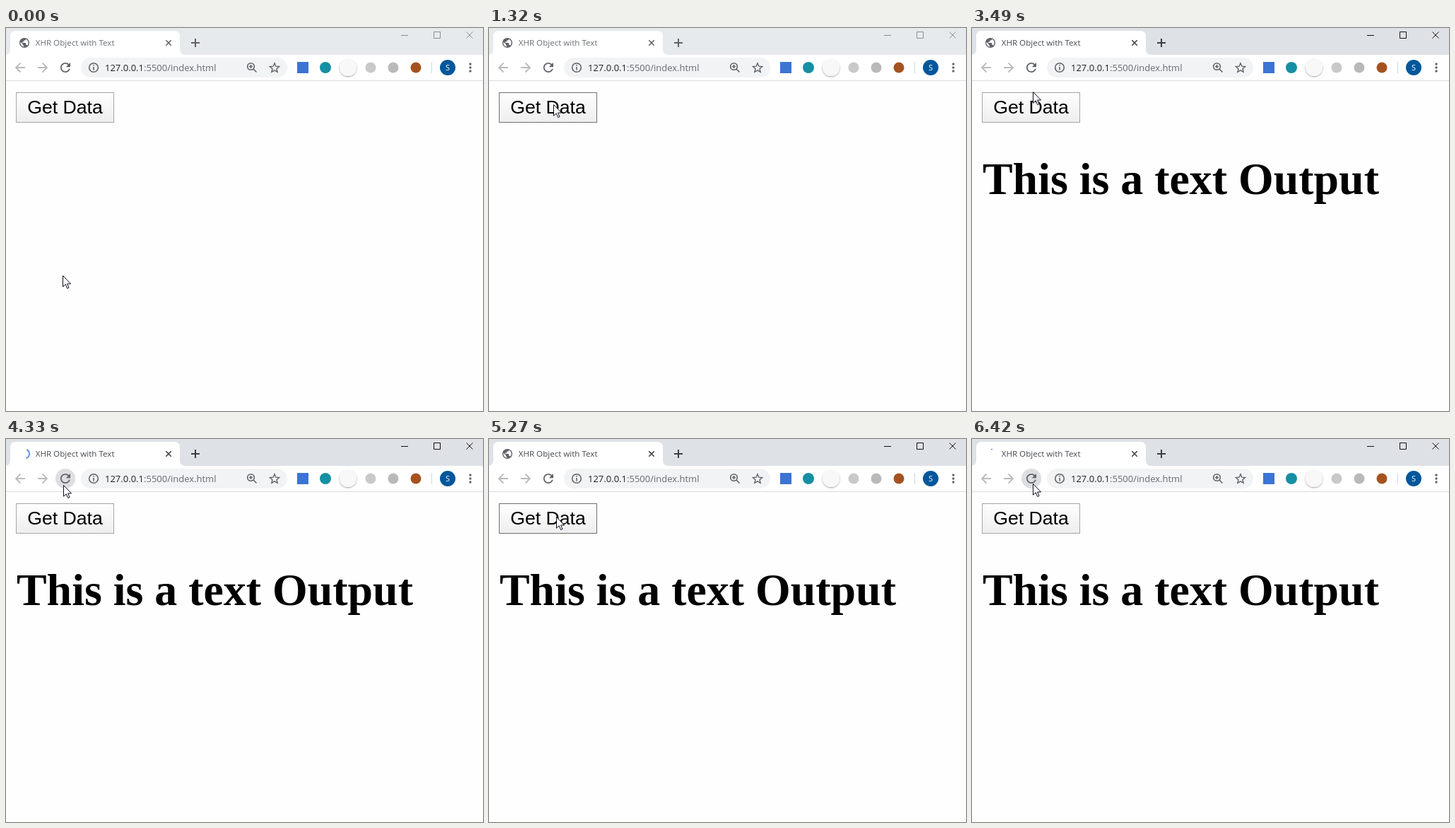
Animation of 675 by 542 pixels, one loop 6.5 s. Source, as an HTML page:

```html
<!DOCTYPE html>
<html lang="en">
<head>
<meta charset="utf-8">
<title>XHR Object with Text</title>
<style>
  html, body { margin: 0; width: 100%; height: 100%; overflow: hidden; background: #fefefe; }
  svg { display: block; width: 100vw; height: 100vh; }
  .ui { font-family: "Open Sans", "Noto Sans", sans-serif; }
  .line { fill: none; stroke: #5f6368; stroke-width: 1.6; }
  .icon { fill: #5f6368; }
  #strip { fill: #dee1e6; }
  #title { fill: #45494d; }
  #controls { fill: none; stroke: #111; }
  #tabIcons { fill: none; stroke: #3c4043; }
  .inactive #strip { fill: #e7eaed; }
  .inactive #title { fill: #6a6e73; }
  .inactive #controls { stroke: #8b8d8f; }
  .inactive #tabIcons { stroke: #5f6368; }
  #button rect { fill: url(#face); stroke: #a6a6a6; }
  #button.hover rect { stroke: #707070; }
  #button.pressed rect { fill: url(#pressedFace); }
</style>
</head>
<body>
<svg id="stage" viewBox="0 0 675 542">
  <defs>
    <linearGradient id="face" x2="0" y2="1">
      <stop stop-color="#fefefe"/><stop offset="1" stop-color="#eeeeee"/>
    </linearGradient>
    <linearGradient id="pressedFace" x2="0" y2="1">
      <stop stop-color="#e6e6e6"/><stop offset="1" stop-color="#f2f2f2"/>
    </linearGradient>
    <filter id="shadow" x="-50%" y="-50%" width="200%" height="200%">
      <feDropShadow dx="0" dy="1" stdDeviation="1.2" flood-opacity=".4"/>
    </filter>
  </defs>
  <rect width="675" height="542" fill="#fefefe"/>

  <!-- Tab strip -->
  <rect id="strip" width="675" height="38"/>
  <path fill="#fff" d="M-2 38Q6 38 6 30V12Q6 4 14 4H238Q246 4 246 12V30Q246 38 254 38Z"/>
  <path id="globe" class="icon" transform="translate(17.6 12.6) scale(.7)" d="M12 2C6.48 2 2 6.48 2 12s4.48 10 10 10 10-4.48 10-10S17.52 2 12 2zm-1 17.93c-3.95-.49-7-3.85-7-7.93 0-.62.08-1.21.21-1.79L9 15v1c0 1.1.9 2 2 2v1.93zm6.9-2.54c-.26-.81-1-1.39-1.9-1.39h-1v-3c0-.55-.45-1-1-1H8v-2h2c.55 0 1-.45 1-1V7h2c1.1 0 2-.9 2-2v-.41c2.93 1.19 5 4.06 5 7.41 0 2.08-.8 3.97-2.1 5.39z"/>
  <path id="spinner" fill="none" stroke="#4a86e0" stroke-width="1.7"/>
  <text id="title" class="ui" x="41.7" y="25" font-size="11.6">XHR Object with Text</text>
  <g id="tabIcons">
    <path stroke-width="1.6" d="M226.3 17.3l7.4 7.4m0-7.4l-7.4 7.4"/>
    <path stroke-width="2" d="M262 21h12m-6-6v12"/>
  </g>
  <path id="controls" d="M559 10.5h10M605.5 5.5h9v9h-9zM651.5 5.5l9 9m0-9l-9 9"/>

  <!-- Toolbar -->
  <rect y="38" width="675" height="36" fill="#fff"/>
  <rect y="74" width="675" height="1" fill="#dadce0"/>
  <g fill="none" stroke="#b9bbbe" stroke-width="1.8">
    <path d="M27 56H14.5M20.5 49.5L14 56l6.5 6.5"/>
    <path d="M45 56h12.5M51.5 49.5L58 56l-6.5 6.5"/>
  </g>
  <circle id="ripple" cx="84" cy="56" r="14" fill="#dddee0"/>
  <path class="icon" transform="translate(73.5 45.5) scale(.875)" d="M17.65 6.35C16.2 4.9 14.21 4 12 4c-4.42 0-7.99 3.58-7.99 8s3.57 8 7.99 8c3.73 0 6.84-2.55 7.73-6h-2.08c-.82 2.33-3.04 4-5.65 4-3.31 0-6-2.69-6-6s2.69-6 6-6c1.66 0 3.14.69 4.22 1.78L13 11h7V4l-2.35 2.35z"/>
  <rect x="106" y="42" width="292" height="28" rx="14" fill="#f1f3f4"/>
  <g class="line">
    <circle cx="124" cy="56" r="6.3"/>
    <path d="M124 55v4.5M124 52v1.6"/>
    <circle cx="346.5" cy="54.5" r="4.8"/>
    <path d="M350 58l4.5 4.5M344 54.5h5m-2.5-2.5v5"/>
    <path stroke-width="1.4" d="M380 49.8l1.9 4.4 4.7.4-3.6 3.1 1.1 4.6-4.1-2.5-4.1 2.5 1.1-4.6-3.6-3.1 4.7-.4z"/>
  </g>
  <text class="ui" x="140" y="61" font-size="13" fill="#202124">127.0.0.1<tspan fill="#666a6f">:5500/index.html</tspan></text>

  <rect x="412" y="48" width="16" height="16" fill="#3b74d4"/>
  <circle cx="452" cy="56" r="8" fill="#158fa3"/>
  <circle id="badge" cx="484" cy="56" r="12" fill="#f8f8f8" filter="url(#shadow)"/>
  <circle cx="516" cy="56" r="7.5" fill="#c9c9c9"/>
  <circle cx="548" cy="56" r="7.5" fill="#b9b9b9"/>
  <circle cx="580" cy="56" r="7.5" fill="#a5521f"/>
  <rect x="602" y="48" width="1" height="16" fill="#cfd6e0"/>
  <circle cx="625" cy="56" r="11" fill="#01579b"/>
  <text class="ui" x="625" y="60" font-size="11" text-anchor="middle" fill="#fff">S</text>
  <g class="icon">
    <circle cx="657" cy="51" r="1.7"/><circle cx="657" cy="56" r="1.7"/><circle cx="657" cy="61" r="1.7"/>
  </g>

  <!-- Page -->
  <g id="button">
    <rect x="14.5" y="91.5" width="138" height="42"/>
    <text x="83.5" y="120.5" font-size="26.67" text-anchor="middle" font-family="Liberation Sans, Arial, sans-serif">Get Data</text>
  </g>
  <text id="output" x="15" y="235" font-size="63.9" font-weight="bold" font-family="Liberation Serif, Times New Roman, serif">This is a text Output</text>

  <path id="cursor" fill="#fff" stroke="#0b0b1c" d="M.5 .5V16.2L4.2 12.8L6.7 18.5L9 17.5L6.6 12H11.5Z"/>
</svg>
<script>
const LOOP = 6500, STEPS = 84;
const el = id => document.getElementById(id);

// Cursor path: [step, x, y]
const path = [
  [0, 80, 350], [9, 73, 127], [17, 91, 108], [44, 91, 108], [45, 86, 90], [50, 81, 65],
  [56, 81, 65], [62, 95, 107], [63, 95, 110], [73, 95, 110], [78, 84, 51], [80, 86, 63], [STEPS, 86, 63]
];

function cursorAt(step) {
  const i = path.findIndex(p => p[0] > step);
  const [s0, x0, y0] = path[i - 1], [s1, x1, y1] = path[i];
  const u = (step - s0) / (s1 - s0), e = u * u * (3 - 2 * u);
  return [Math.round(x0 + (x1 - x0) * e), Math.round(y0 + (y1 - y0) * e)];
}

function arc(from, to) {
  const point = deg => {
    const a = deg * Math.PI / 180;
    return `${26.5 + 6.5 * Math.sin(a)} ${21 - 6.5 * Math.cos(a)}`;
  };
  return `M${point(from)}A6.5 6.5 0 0 1 ${point(to)}`;
}

const show = (id, on) => el(id).style.display = on ? "" : "none";

function draw(step) {
  const within = (a, b) => step >= a && step < b;
  const [x, y] = cursorAt(step);
  const loading = within(53, 57) || step >= 82;
  const spin = step - (step < 82 ? 54 : 83);

  el("cursor").setAttribute("transform", `translate(${x} ${y})`);
  el("stage").classList.toggle("inactive", step < 22);
  el("button").classList.toggle("hover", y >= 91 && y < 134);
  el("button").classList.toggle("pressed", within(22, 24) || within(66, 68));
  show("output", within(24, 57) || step >= 68);
  show("globe", !loading);
  show("ripple", loading);
  show("badge", step !== 53 && step !== 82);
  show("spinner", loading && spin >= 0);
  el("spinner").setAttribute("d", arc(5 + 10 * spin, 20 + 72 * spin));
}

const start = performance.now();
function tick() {
  const t = (performance.now() - start) % LOOP;
  draw(Math.min(STEPS - 1, Math.floor(t / LOOP * STEPS + 0.15)));
  requestAnimationFrame(tick);
}
tick();
</script>
</body>
</html>
```
